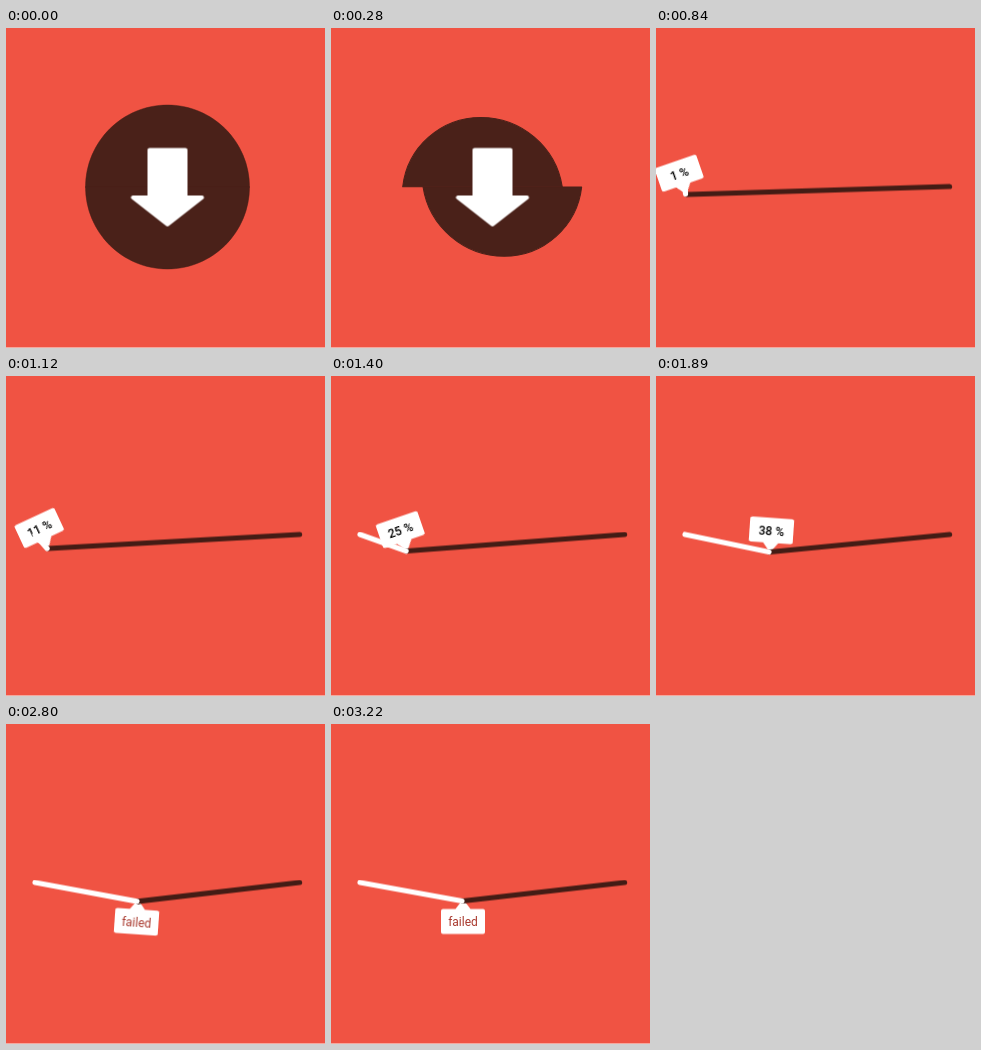
Write an HTML page without scripts that moves like this. It is 319 px wide and 320 px high and loops after 3.29 s.

```html
<!DOCTYPE html>
<html lang="en">
<head>
<meta charset="utf-8">
<title>Download progress</title>
<style>
@property --n { syntax: "<integer>"; inherits: true; initial-value: 0; }

html, body { margin: 0; width: 100%; height: 100%; overflow: hidden; background: #f05343; }
svg { display: block; width: 100vw; height: 100vh; }
svg * { animation: 3290ms linear infinite; }

.edge { fill: #f5a79d; }
.half { fill: #4a2119; stroke: #4a2119; stroke-linecap: round; stroke-linejoin: round; }
.top { animation-name: top, thin; }
.low { animation-name: low, thin; }
.bar { fill: none; stroke-width: 5.2; stroke-linecap: round; }
.rest { stroke: #431c15; animation-name: rest, showRest; }
.done { stroke: #fff; animation-name: done, showDone; }
.tip { animation-name: move; }
.swing { animation-name: swing; }
.shape { fill: #fff; stroke: #fff; stroke-width: 4; stroke-linejoin: round; animation-name: shape; }
.fail { animation-name: upright, showFail; }
.fail text { fill: #a8382d; text-anchor: middle; }
.fail text, .count { font: 12px Roboto, Arial, sans-serif; }
.count { color: #000; font-weight: 500; line-height: 25px; text-align: center; white-space: pre; animation-name: count, showCount; }
.count::after { counter-reset: n var(--n); content: counter(n) " %"; }

/* disc splits into two sliding halves that flatten into the bar */
@keyframes top {
  0%, 2.13% { d: path("M79.5 159 C79.5 113.7 116.2 77 161.5 77 S243.5 113.7 243.5 159Z"); animation-timing-function: ease-in; }
  14.89% { d: path("M55 158.2 C69 132 95 116.3 125 116.3 S185 130 205 158.2Z"); }
  17.02% { d: path("M48 158 C70 144 95 138 122 138 S190 147 212 158Z"); }
  21.28%, 100% { d: path("M29 158 C60 158 95 158 120 158 S200 158 220 158Z"); }
}
@keyframes low {
  0%, 2.13% { d: path("M243.5 159 C243.5 204.3 206.8 241 161.5 241 S79.5 204.3 79.5 159Z"); animation-timing-function: ease-in; }
  14.89% { d: path("M266 159 C252 185 226 201 198 201 S138 187 119 159Z"); }
  17.02% { d: path("M272 158 C251 172 226 178 200 178 S133 169 111 158Z"); }
  21.28%, 100% { d: path("M294 158 C263 158 228 158 203 158 S123 158 103 158Z"); }
}
@keyframes thin {
  0% { stroke-width: .5; opacity: 1; }
  14.89% { stroke-width: 1.5; }
  21.27% { stroke-width: 5; opacity: 1; }
  21.28%, 100% { stroke-width: 5; opacity: 0; }
}

/* tip position, matched by the ends of both bar parts */
@keyframes move {
  0%, 8.5% { transform: translate(161.5px, 199.5px); }
  14.89% { transform: translate(156px, 199.3px); }
  17.02% { transform: translate(146px, 191px); }
  19.15% { transform: translate(112px, 172px); }
  21.28% { transform: translate(62px, 160px); }
  23.4% { transform: translate(30px, 158px); }
  25.53% { transform: translate(30px, 165px); }
  29.79% { transform: translate(33px, 168px); }
  34.04% { transform: translate(42px, 171px); }
  38.3% { transform: translate(58px, 173px); }
  42.55% { transform: translate(76px, 173.5px); }
  51.06% { transform: translate(103px, 174.5px); }
  57.45% { transform: translate(114px, 175.3px); }
  68.09% { transform: translate(129px, 176px); }
  72.34% { transform: translate(130px, 176px); }
  74.47% { transform: translate(132px, 178px); }
  78.72% { transform: translate(132px, 175.5px); }
  82.98% { transform: translate(132px, 177px); }
  91%, 100% { transform: translate(132px, 176.5px); }
}
@keyframes rest {
  0%, 23.4% { d: path("M29 158 L293.6 158"); }
  25.53% { d: path("M31 166 L293.6 158"); }
  29.79% { d: path("M33 169 L293.6 158"); }
  34.04% { d: path("M42 172 L293.6 158"); }
  38.3% { d: path("M58 174 L293.6 158"); }
  42.55% { d: path("M76 174.5 L293.6 158"); }
  51.06% { d: path("M103 175 L293.6 158"); }
  57.45% { d: path("M114 175.5 L293.6 158"); }
  68.09% { d: path("M129 176 L293.6 158"); }
  72.34% { d: path("M130 176 L293.6 158"); }
  74.47% { d: path("M132 178 L293.6 158"); }
  78.72% { d: path("M132 175.5 L293.6 158"); }
  82.98% { d: path("M132 177 L293.6 158"); }
  91%, 100% { d: path("M132 176.5 L293.6 158"); }
}
@keyframes done {
  0%, 23.4% { d: path("M29 158 L29 158"); }
  25.53% { d: path("M29 158 L29.5 165.5"); }
  29.79% { d: path("M29 158 L32 169"); }
  34.04% { d: path("M29 158 L41 172"); }
  38.3% { d: path("M29 158 L57 174"); }
  42.55% { d: path("M29 158 L75 174.5"); }
  51.06% { d: path("M29 158 L102 175"); }
  57.45% { d: path("M29 158 L113 175.5"); }
  68.09% { d: path("M29 158 L128 176"); }
  72.34% { d: path("M29 158 L129 176"); }
  74.47% { d: path("M29 158 L131 178"); }
  78.72% { d: path("M29 158 L131 175.5"); }
  82.98% { d: path("M29 158 L131 177"); }
  91%, 100% { d: path("M29 158 L131 176.5"); }
}
@keyframes swing {
  0%, 14.89% { transform: rotate(0deg); }
  19.15%, 21.28% { transform: rotate(12deg); }
  23.4% { transform: rotate(-4deg); }
  25.53% { transform: rotate(-19deg); }
  29.79% { transform: rotate(-26deg); }
  34.04% { transform: rotate(-25deg); }
  42.55% { transform: rotate(-19deg); }
  51.06% { transform: rotate(-3deg); }
  57.45% { transform: rotate(4deg); }
  63.83%, 68.09% { transform: rotate(1deg); }
  70.21% { transform: rotate(30deg); }
  72.34% { transform: rotate(86deg); }
  74.47% { transform: rotate(155deg); }
  76.6% { transform: rotate(200deg); }
  78.72% { transform: rotate(196deg); }
  80.85% { transform: rotate(172deg); }
  82.98% { transform: rotate(173deg); }
  85.11% { transform: rotate(184deg); }
  89.36% { transform: rotate(178deg); }
  93.6%, 100% { transform: rotate(180deg); }
}

/* arrow becomes the speech bubble */
@keyframes shape {
  0%, 14.89% { d: path("M-18 -77.5 L18 -77.5 L18 -30 L34.5 -30 L0 -3 L-34.5 -30 L-18 -30Z"); }
  17.02% { d: path("M-18 -69 L18 -69 L18 -26 L28 -26 L0 -3 L-28 -26 L-18 -26Z"); }
  23.4%, 100% { d: path("M-20 -31.5 L20 -31.5 L20 -10.5 L6.5 -10.5 L0 -2 L-6.5 -10.5 L-20 -10.5Z"); }
}
@keyframes count {
  0%, 23.4% { --n: 0; }
  25.53% { --n: 1; }
  34.04% { --n: 11; }
  42.55% { --n: 25; }
  51.06% { --n: 34; }
  57.45% { --n: 38; }
  62%, 100% { --n: 39; }
}
@keyframes upright {
  0%, 70.21% { transform: rotate(-30deg); }
  72.34% { transform: rotate(-86deg); }
  76.6%, 100% { transform: rotate(-180deg); }
}

/* hard switches */
@keyframes showRest {
  0%, 21.27% { opacity: 0; }
  21.28%, 100% { opacity: 1; }
}
@keyframes showDone {
  0%, 23.39% { opacity: 0; }
  23.4%, 100% { opacity: 1; }
}
@keyframes showCount {
  0%, 23.39% { opacity: 0; }
  23.4%, 70.2% { opacity: 1; }
  70.21%, 100% { opacity: 0; }
}
@keyframes showFail {
  0%, 70.2% { opacity: 0; }
  70.21%, 100% { opacity: 1; }
}
</style>
</head>
<body>
<svg viewBox="0 0 319 320" preserveAspectRatio="none">
  <rect class="edge" y="319" width="319" height="1"/>
  <path class="half top"/>
  <path class="half low"/>
  <g class="tip">
    <g class="swing">
      <path class="shape"/>
      <foreignObject x="-22" y="-32.5" width="44" height="25">
        <div class="count"></div>
      </foreignObject>
      <g transform="translate(0 -21)">
        <g class="fail"><text y="4.5">failed</text></g>
      </g>
    </g>
  </g>
  <g transform="translate(0 .5)">
    <path class="bar rest"/>
    <path class="bar done"/>
  </g>
</svg>
</body>
</html>
```
